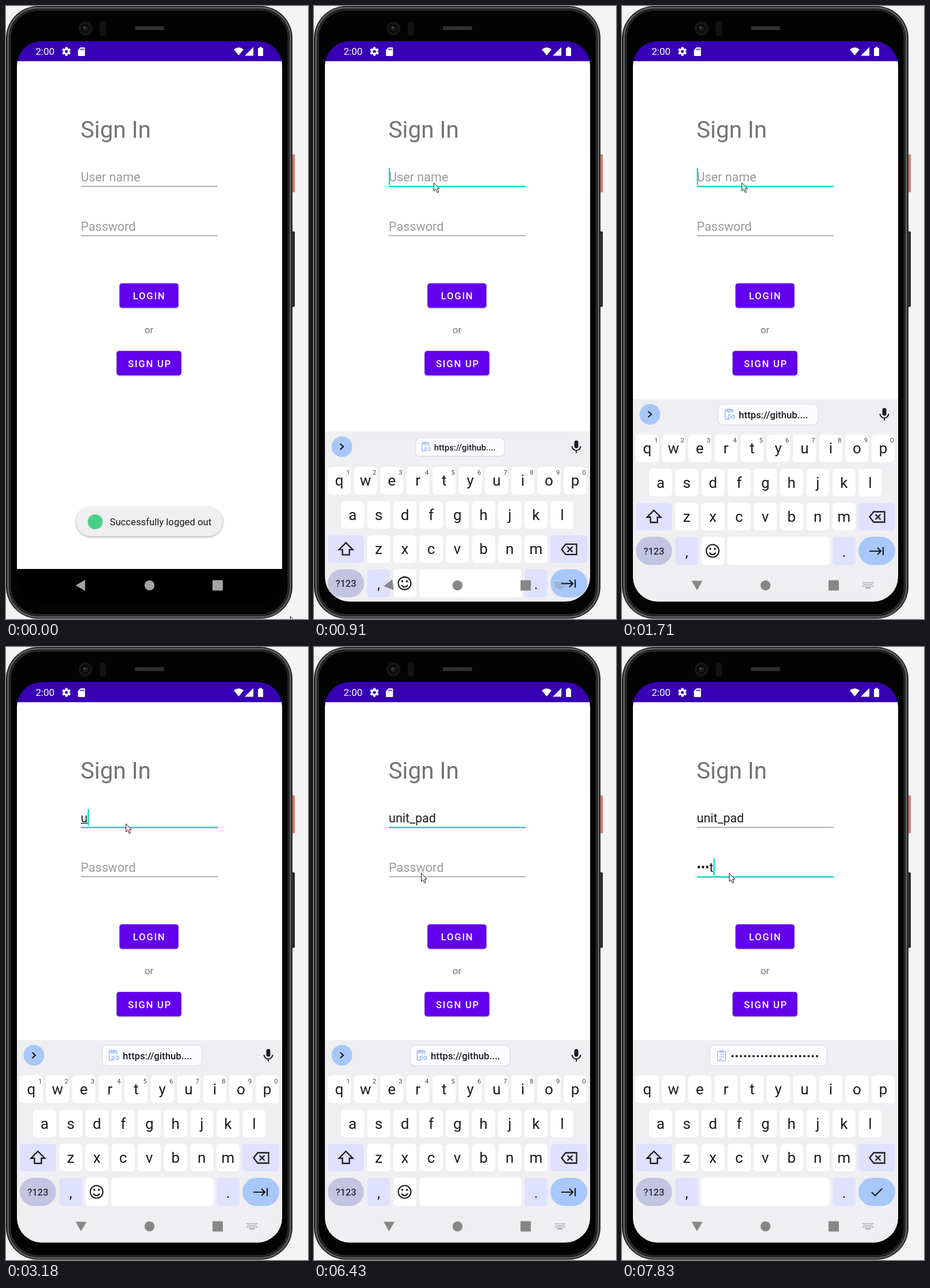
These frames come from a looping animation (525x1066 px, 8000 ms). An HTML page with a canvas:

```html
<!DOCTYPE html>
<html lang="en">
<head>
<meta charset="utf-8">
<title>Sign in</title>
<style>
html, body { margin: 0; width: 100%; height: 100%; overflow: hidden; background: #f4f4f4; }
canvas { display: block; width: 525px; height: 1066px; }
</style>
</head>
<body>
<canvas id="stage"></canvas>
<script>
const LOOP = 8000;
const USER = 'unit_pad';
const USER_TIMES = [2970, 3320, 3380, 3650, 4310, 4570, 4840, 4910];
const PASS_TIMES = [7240, 7500, 7560, 7830];
const CARET_OFF = [[1250, 1710], [2240, 2770], [5370, 5900], [6370, 6570], [7100, 7240]];
const RISE_STEPS = [840, 910, 990, 1050, 1110];
const FOCUS_USER = 720, FOCUS_PASS = 6570, KEYS_SWAP = 6640;
const TEAL = '#03dac5', PURPLE = '#6200ee', INK = '#1b1b1f';
const LILAC = '#e0e0ff', BLUE = '#a8c7fa', PALE_BLUE = '#a3bff0';

const canvas = document.getElementById('stage');
const ctx = canvas.getContext('2d');
const ratio = window.devicePixelRatio || 1;
canvas.width = 525 * ratio;
canvas.height = 1066 * ratio;

const clamp = v => Math.max(0, Math.min(1, v));
const countBy = (times, t) => times.filter(x => x <= t).length;
const stepOf = (steps, t) => steps.filter(x => x <= t).pop();

function box(x, y, w, h, r, fill, stroke, width = 1) {
  ctx.beginPath();
  ctx.roundRect(x, y, w, h, r);
  if (fill) { ctx.fillStyle = fill; ctx.fill(); }
  if (stroke) { ctx.strokeStyle = stroke; ctx.lineWidth = width; ctx.stroke(); }
}

function disc(x, y, r, fill) {
  ctx.beginPath();
  ctx.arc(x, y, r, 0, 7);
  ctx.fillStyle = fill;
  ctx.fill();
}

function text(str, x, y, size, fill, { align = 'left', weight = 400, spacing = 0 } = {}) {
  ctx.font = `${weight} ${size}px Roboto, sans-serif`;
  ctx.textAlign = align;
  ctx.letterSpacing = spacing + 'px';
  ctx.fillStyle = fill;
  ctx.fillText(str, x, y);
  ctx.letterSpacing = '0px';
}

// Draws an SVG path at an offset, filled and/or stroked.
function shape(d, x, y, { fill, stroke, width = 2, turn = 0 } = {}) {
  const p = new Path2D(d);
  ctx.save();
  ctx.translate(x, y);
  ctx.rotate(turn);
  if (fill) { ctx.fillStyle = fill; ctx.fill(p); }
  if (stroke) { ctx.strokeStyle = stroke; ctx.lineWidth = width; ctx.stroke(p); }
  ctx.restore();
}

function withShadow(blur, dy, alpha, draw) {
  ctx.save();
  ctx.shadowColor = `rgba(0,0,0,${alpha})`;
  ctx.shadowBlur = blur * ratio;
  ctx.shadowOffsetY = dy * ratio;
  draw();
  ctx.restore();
}

function drawPhone() {
  ctx.fillStyle = '#f4f4f4';
  ctx.fillRect(0, 0, 525, 1066);
  box(495, 258, 7, 66, 1, '#dd8b7c');
  box(500, 258, 2, 66, 1, '#c4705f');
  box(495, 392, 7, 131, 1.5, '#1d1d1b');
  box(498, 394, 1.5, 127, 0, '#454541');
  box(0, 0, 498, 1065.5, 56, '#1f2020');
  box(3.5, 3, 491, 1059.5, 52.5, null, '#5f6161', 2.6);
  box(7.5, 7, 483, 1051.5, 49, '#030303', '#2a2b2b', 2);

  disc(138, 39, 12, '#161616');
  disc(138, 39, 8, '#0b0b0c');
  disc(138, 39, 4.5, '#1c1d20');
  disc(136.5, 37.5, 1.5, '#5b5d60');
  box(163, 27, 11, 25, 5, '#121212');
  box(224, 35, 51, 7, 1.5, '#292929');
  ctx.fillStyle = '#404040';
  for (let x = 226; x < 274; x += 3) ctx.fillRect(x, 36, 1, 5);
}

function drawStatusBar() {
  ctx.fillStyle = '#3700b3';
  ctx.fillRect(19, 60, 461, 36);
  text('2:00', 51.5, 85, 17, '#fff');

  ctx.save();
  ctx.translate(105, 79);
  for (let i = 0; i < 6; i++) {
    ctx.rotate(Math.PI / 3);
    box(-2, -7.8, 4, 5, 0.8, '#fff');
  }
  ctx.restore();
  disc(105, 79, 5.7, '#fff');
  disc(105, 79, 2.6, '#3700b3');

  shape('M4.5 0H11a1.3 1.3 0 0 1 1.3 1.3V13.7a1.3 1.3 0 0 1-1.3 1.3H1.3A1.3 1.3 0 0 1 0 13.7V4.5Z', 125, 72, { fill: '#fff' });
  ctx.fillStyle = '#3700b3';
  for (let i = 0; i < 3; i++) ctx.fillRect(129.5 + i * 2.4, 74, 1.3, 3);

  shape('M0 3.5Q8.5-3.5 17 3.5L8.5 14Z', 396, 72, { fill: '#fff' });
  shape('M15 0V15H0Z', 415, 71.5, { fill: '#fff' });
  box(438, 73, 9, 14, 1, '#fff');
  ctx.fillRect(440.5, 71, 4, 2);
}

function drawButton(x, y, w, label, labelX) {
  withShadow(2.5, 1.2, 0.3, () => box(x + 0.3, y + 0.3, w - 0.6, 42.4, 4.5, PURPLE));
  text(label, labelX, y + 28.3, 16.8, '#fff', { weight: 500, spacing: 1.7 });
}

function drawField(y, value, hint, focused, caret, composed) {
  const size = 21.6, x = 130;
  if (value) text(value, x, y, size, INK);
  else text(hint, x, y, size, '#9b9b9b');
  ctx.fillStyle = focused ? TEAL : '#808080';
  ctx.fillRect(x, y + (focused ? 7.6 : 8), 238, focused ? 2.5 : 1.1);
  ctx.font = `400 ${size}px Roboto, sans-serif`;
  if (composed) {
    ctx.fillStyle = INK;
    ctx.fillRect(x, y + 1, ctx.measureText(value.slice(0, composed)).width, 1.3);
  }
  if (caret) {
    ctx.fillStyle = TEAL;
    ctx.fillRect(x + ctx.measureText(value).width, y - 23.5, 2.3, 29.5);
  }
}

function drawForm(t) {
  ctx.fillStyle = '#fff';
  ctx.fillRect(19, 96, 461, 883);
  text('Sign In', 129.5, 229, 40.5, '#747474');

  const caret = t >= FOCUS_USER && !CARET_OFF.some(([a, b]) => t >= a && t < b);
  const onUser = t >= FOCUS_USER && t < FOCUS_PASS;
  const onPass = t >= FOCUS_PASS;
  const composed = t < 4310 ? countBy([3180, 3380, 3650, 3910], t) : 0;
  const name = USER.slice(0, countBy(USER_TIMES, t));
  const n = countBy(PASS_TIMES, t);
  const secret = n ? '•'.repeat(n - 1) + USER[n - 1] : '';
  drawField(305, name, 'User name', onUser, onUser && caret, composed);
  drawField(391, secret, 'Password', onPass, onPass && caret, 0);

  drawButton(197, 482, 103, 'LOGIN', 220.7);
  text('or', 248.5, 569, 17, '#747474', { align: 'center' });
  drawButton(192, 599.5, 113, 'SIGN UP', 212);
}

function drawToast(t) {
  const alpha = 1 - clamp((t - 290) / 505);
  if (!alpha) return;
  ctx.save();
  ctx.globalAlpha = alpha;
  withShadow(4, 1.5, 0.35, () => box(122, 871, 254.5, 51, 25.5, '#efeff0'));
  disc(155, 897, 13, '#4bd08a');
  text('Successfully logged out', 180.5, 903, 16.7, INK);
  ctx.restore();
}

function drawClipboard(x, y, linked) {
  ctx.lineJoin = 'round';
  if (linked) {
    shape('M7 8H1V-8H14V-2M4-9H11V-5H4Z', x, y, { stroke: PALE_BLUE, width: 1.8 });
    shape('M10 1H9a3 3 0 0 0 0 6H10M13 1H14a3 3 0 0 1 0 6H13M9 4H14', x, y, { stroke: PALE_BLUE, width: 1.8 });
  } else {
    shape('M1-7H15V9H1ZM4-2H12M4 2H12M4 6H9', x, y, { stroke: PALE_BLUE, width: 1.6 });
    box(x + 4.5, y - 9, 7, 4, 1, PALE_BLUE);
  }
  ctx.lineJoin = 'miter';
}

function drawSuggestions(secret, scale) {
  if (!secret) {
    disc(48.5, 710, 18, BLUE);
    shape('M-3-5L2.5 0L-3 5', 48.5, 710, { stroke: INK, width: 2.2 });
    box(452.5, 699, 7, 13.5, 3.5, INK);
    shape('M-7.5-1a7.5 7.5 0 0 0 15 0M0 6.5V11', 456, 710, { stroke: INK, width: 2 });
  }
  ctx.save();
  ctx.translate(254, 710.5);
  ctx.scale(scale, scale);
  ctx.translate(-254, -710.5);
  if (secret) {
    box(152, 692.5, 204, 36, 9, '#fcfcff', '#d6d8e0', 1.2);
    drawClipboard(165, 710.5, false);
    for (let i = 0; i < 21; i++) disc(192 + i * 7.35, 711.5, 2, INK);
  } else {
    box(167, 692.5, 174, 36, 9, '#fcfcff', '#d6d8e0', 1.2);
    drawClipboard(178.5, 710.5, true);
    text('https://github....', 203, 717, 16.8, INK, { weight: 500 });
  }
  ctx.restore();
}

function drawKeyRow(letters, cx, top, digits) {
  [...letters].forEach((c, i) => {
    const x = cx + i * 45.55;
    box(x - 20, top, 40, 48, 6, '#fff');
    text(c, x, top + 33, 26, INK, { align: 'center' });
    if (digits) text((i + 1) % 10, x + 15.5, top + 13.5, 11.5, '#46464f', { align: 'center' });
  });
}

function drawKeyboard(secret, offset) {
  ctx.save();
  ctx.translate(0, offset);
  ctx.fillStyle = '#efeff1';
  ctx.fillRect(19, 683.5, 461, 360);
  drawSuggestions(secret, 1 - Math.min(0.3, offset * 0.002));
  drawKeyRow('qwertyuiop', 44, 745, !secret);
  drawKeyRow('asdfghjkl', 67, 804.5, false);
  drawKeyRow('zxcvbnm', 112.5, 864, false);

  box(24, 864, 63, 48, 6, LILAC);
  shape('M0-11L12 1H6V10H-6V1H-12Z', 55.5, 888, { stroke: INK, width: 2.3 });
  box(411, 864, 64, 48, 6, LILAC);
  shape('M-13 0L-6-9H13V9H-6ZM-3-4.5L6 4.5M6-4.5L-3 4.5', 443.5, 888.5, { stroke: INK, width: 2.3 });

  box(24, 923, 63, 49, 24.5, '#c3c3e2');
  text('?123', 55.5, 954, 16.5, '#2c2c3a', { align: 'center', weight: 500 });
  box(92.5, 923, 40, 49, 6, LILAC);
  text(',', 112.5, 958, 25, INK, { align: 'center' });
  box(366, 923, 40, 49, 6, LILAC);
  text('.', 386, 958, 25, INK, { align: 'center' });
  box(411, 923, 64, 49, 24.5, BLUE);
  if (secret) {
    box(137.5, 923, 223.5, 49, 6, '#fff');
    shape('M-9 0L-3 6L9-6', 443, 948, { stroke: INK, width: 2.2 });
  } else {
    box(138, 923, 40, 49, 6, '#fff');
    box(183, 923, 178, 49, 6, '#fff');
    shape('M-11 0A11 11 0 0 1 11 0A11 11 0 0 1-11 0ZM-5.5 3Q0 10 5.5 3', 157.5, 947.5, { stroke: INK, width: 2.1 });
    disc(153.5, 944, 1.8, INK);
    disc(161.5, 944, 1.8, INK);
    shape('M-13 0H7M1-6L7 0L1 6M11-7V7', 443, 948, { stroke: INK, width: 2.2 });
  }
  ctx.restore();
}

function drawNav(t, light) {
  const color = light ? '#878788' : '#a3a3a3';
  const turn = light ? clamp((stepOf(RISE_STEPS, t) - 890) / 220) : 0;
  shape('M-9.5 0L7-9.5V9.5Z', 130.5, 1007.5 - turn, { fill: color, turn: -turn * Math.PI / 2 });
  disc(249.5, 1007.5, 8.7, color);
  box(359, 998.5, 18, 18, 1, color);
  if (t < 790) return;
  ctx.fillStyle = color;
  for (let row = 0; row < 3; row++)
    for (let col = 0; col < 6 - row % 2; col++)
      ctx.fillRect(418.5 + col * 3.3 + row % 2 * 1.6, 1002 + row * 3, 1.7, 1.6);
  ctx.fillRect(423, 1011, 9, 1.6);
}

function drawPointer(t) {
  const held = t < 70 ? 0 : 70 + Math.floor((t - 70) / 65.45) * 65.45;
  const ease = v => v * v * (3 - 2 * v);
  const a = ease(clamp(held / 590));
  const b = t < 6230 ? 0 : Math.min(1, (Math.floor((t - 6230) / 66) + 1) / 4);
  const x = 494 - 286 * a - 22 * b;
  const y = 1061 - 754 * a + 86 * b;
  shape('M0 0V14L3.2 11.2L5.8 17L8 16L5.5 10.3H9.8Z', x + 0.5, y + 0.5, { fill: '#fff', stroke: '#151515', width: 1 });
}

function draw(t) {
  ctx.setTransform(ratio, 0, 0, ratio, 0, 0);
  drawPhone();
  ctx.save();
  ctx.beginPath();
  ctx.roundRect(19, 61, 461, 974.7, 43);
  ctx.clip();
  ctx.fillStyle = '#000';
  ctx.fillRect(19, 60, 461, 976);
  drawForm(t);
  drawStatusBar();
  drawToast(t);
  const open = t >= RISE_STEPS[0];
  if (open) {
    const step = stepOf(RISE_STEPS, t);
    const offset = step < 1110 ? 250 * Math.exp((840 - step) / 47) : 0;
    drawKeyboard(t >= KEYS_SWAP, offset);
  }
  drawNav(t, open);
  ctx.restore();
  drawPointer(t);
}

const start = performance.now();
function tick() {
  draw((performance.now() - start) % LOOP);
  requestAnimationFrame(tick);
}
tick();
</script>
</body>
</html>
```
